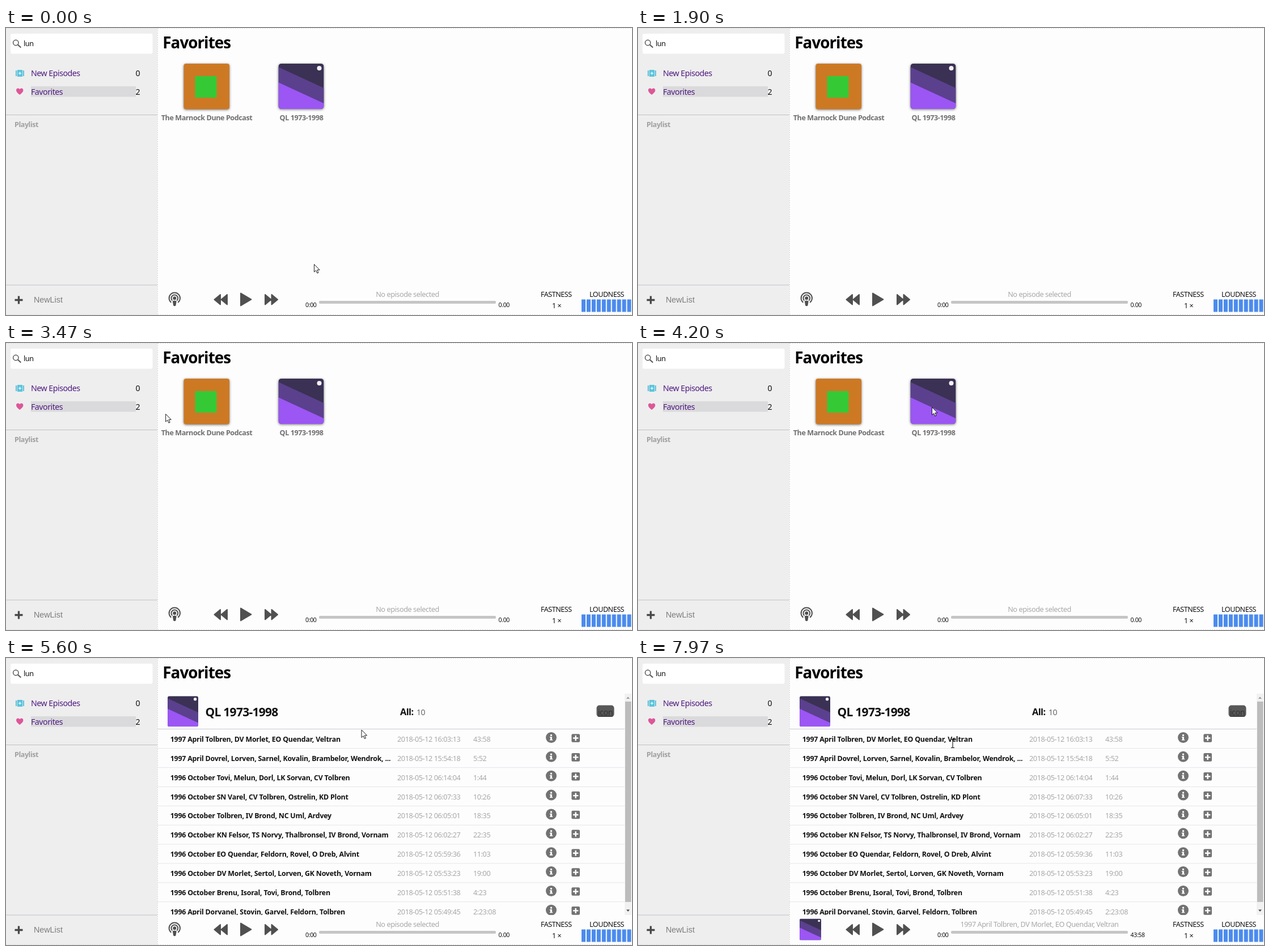
These frames come from a looping animation (1104 by 507 pixels, 8000 ms). An HTML page:

```html
<!DOCTYPE html>
<html lang="en">
<head>
<meta charset="utf-8">
<title>Podcast player</title>
<style>
html, body { margin: 0; width: 100%; height: 100%; overflow: hidden; background: #fdfdfd; }
svg { display: block; width: 1104px; height: 507px; }
text { font: 12.7px "Noto Sans", "Open Sans", sans-serif; letter-spacing: -.035em; fill: #111; }
.bold { font-weight: 700; }
.nav { font-size: 14.2px; }
.link { fill: #4f1a80; }
.muted { fill: #a8a8a8; }
.mid { text-anchor: middle; }
.time { font-size: 10.6px; }
.caps { font-size: 12.5px; }
.ink { fill: #505050; }
.row-title { font-size: 12.4px; font-weight: 700; letter-spacing: -.018em; }
.caption { font-size: 12.6px; fill: #707070; }
.card { filter: drop-shadow(0 1px 2px rgba(0, 0, 0, .55)); }
</style>
</head>
<body>
<svg viewBox="0 0 1104 507">
  <defs>
    <clipPath id="tile"><rect width="80" height="80" rx="5"/></clipPath>
    <clipPath id="listArea"><rect x="267" y="60" width="837" height="394"/></clipPath>
    <g id="stripes" clip-path="url(#tile)">
      <rect width="80" height="80" fill="#3a3154"/>
      <path d="M0 6L80 43V70L0 33Z" fill="#5b408e"/>
      <path d="M0 33L80 70V80H0Z" fill="#9b56f4"/>
      <circle cx="72" cy="8" r="4" fill="#f2f2f5"/>
    </g>
    <g id="info">
      <circle r="9.5" fill="#727272"/>
      <path d="M-1.5-5.5h3v3h-3ZM-2.6-1.3H1.5V3.4H2.6V5H-2.6V3.4H-1.5V.3H-2.6Z" fill="#fff"/>
    </g>
    <g id="add">
      <rect x="-7.3" y="-7.3" width="14.6" height="14.6" rx="2" fill="#727272"/>
      <path d="M-4.7 0H4.7M0-4.7V4.7" stroke="#fff" stroke-width="2.4"/>
    </g>
  </defs>

  <rect width="1104" height="507" fill="#fdfdfd"/>
  <rect width="267" height="507" fill="#eee"/>
  <path d="M0 .5H1104M267.5 0V507M0 506.5H1104" stroke="#dcdcd8" stroke-dasharray="2 2"/>

  <!-- sidebar -->
  <rect x="8" y="10" width="250.5" height="35.5" rx="3" fill="#fff"/>
  <g fill="none" stroke="#555" stroke-width="1.5">
    <circle cx="17.3" cy="26" r="4.7"/><path d="M20.8 29.5L26.3 34.5" stroke-width="2"/>
  </g>
  <text x="31" y="32">lun</text>
  <g fill="#5cc3dc">
    <path d="M17 75h2.2v10H17ZM29.8 75H32v10h-2.2ZM20 74h9v12h-9Z"/>
    <path d="M22 80h5M24.5 77.5v5" stroke="#e8f6fa" stroke-width="1.4"/>
  </g>
  <text class="nav link" x="44" y="85">New Episodes</text>
  <text class="nav" x="228.5" y="85">0</text>
  <rect x="44" y="103" width="185" height="18.5" fill="#dadadc"/>
  <path d="M24.2 118C20 114.5 18 112.5 18 109.7C18 106 22.5 105.2 24.2 108.3C26 105.2 30.4 106 30.4 109.7C30.4 112.5 28.5 114.5 24.2 118Z" fill="#dd5798"/>
  <text class="nav link" x="44" y="118">Favorites</text>
  <text class="nav" x="228.5" y="118">2</text>
  <path d="M0 153.5H267M0 454H267" stroke="#c2c2c8"/>
  <text class="bold" x="15" y="174.5" style="font-size:12.5px;fill:#a0a0a0">Playlist</text>
  <path d="M15.5 480.5h14M22.5 473.5v14" stroke="#484848" stroke-width="3.3"/>
  <text x="49" y="485" style="font:14.3px 'Liberation Sans',Arial,sans-serif;letter-spacing:0;fill:#7c7c7c">NewList</text>

  <text class="bold" x="276.3" y="35.5" style="font-size:27.8px;fill:#000">Favorites</text>

  <g id="grid">
    <g class="card" transform="translate(313.5 63)">
      <rect width="80.5" height="80.5" rx="4" fill="#cd7924"/>
      <rect x="20" y="22" width="38" height="38" fill="#35c936"/>
    </g>
    <g class="card"><use href="#stripes" transform="translate(480.5 63)"/></g>
    <text class="bold mid caption" x="354" y="163">The Marnock Dune Podcast</text>
    <text class="bold mid caption" x="521" y="163">QL 1973-1998</text>
  </g>

  <g id="list">
    <use href="#stripes" transform="translate(285 67.3) scale(.675)"/>
    <text class="bold" x="351.5" y="102.5" style="font-size:21px">QL 1973-1998</text>
    <text class="bold" x="695" y="101" style="font-size:16.3px">All:</text>
    <text x="724" y="101" style="font-size:14px;fill:#666">10</text>
    <rect x="1041.5" y="83.5" width="31" height="20.5" rx="5" fill="#585858"/>
    <text class="mid" x="1057" y="101" style="font-size:14.5px;fill:#333;text-decoration:underline">icon</text>
    <path d="M267 125.5H1091" stroke="#cacad4"/>
    <g id="rows" clip-path="url(#listArea)"></g>
    <rect x="1091" y="63" width="12" height="391" fill="#f1f1f1"/>
    <rect x="1092" y="77" width="10.5" height="354" fill="#bcbcbc"/>
    <path d="M1094 72l3-3.5 3 3.5Z" fill="#9a9a9a"/>
    <path d="M1094 444.5l3 3.5 3-3.5Z" fill="#484848"/>
  </g>

  <!-- player -->
  <g id="castIcon" transform="translate(297.3 477.3)">
    <path d="M-6 7.6A9.7 9.7 0 1 1 6 7.6M-4 4.2A5.8 5.8 0 1 1 4 4.2" fill="none" stroke="#505050" stroke-width="2"/>
    <circle r="3" class="ink"/>
    <path d="M-3.3 6Q-3.3 4.3 0 4.3T3.3 6L2.2 12.8Q1.8 14 0 14T-2.2 12.8Z" class="ink"/>
  </g>
  <use id="thumb" href="#stripes" transform="translate(285 460.5) scale(.475)"/>
  <g class="ink" stroke="#505050" stroke-width="2" stroke-linejoin="round">
    <path d="M378 471V488.5L367.5 479.7ZM390 471V488.5L379.5 479.7Z"/>
    <path d="M414 468.5V490.5L432.5 479.5Z"/>
    <path d="M457 471V488.5L467.5 479.7ZM468.5 471V488.5L479 479.7Z"/>
  </g>
  <text id="nowPlaying" class="muted mid" x="708" y="474.5"></text>
  <text class="time" x="528" y="493">0:00</text>
  <rect x="552" y="482" width="312" height="5" rx="2" fill="#c5c5c5"/>
  <text id="length" class="time" x="868.5" y="493"></text>
  <text class="caps" x="943" y="474.5">FASTNESS</text>
  <text class="caps" x="963" y="494.5">1 ×</text>
  <text class="caps" x="1029" y="474.5">LOUDNESS</text>
  <g id="bars" fill="#4b8bee"></g>

  <path id="arrow" d="M0 0V13.5L3.2 10.7 5.3 15.6 7.5 14.7 5.4 9.8H9.6Z" fill="#fff" stroke="#111" stroke-width=".95"/>
  <path id="beam" d="M-3-7.5H-.8L0-6.7 .8-7.5H3M0-6.7V6.7M-3 7.5H-.8L0 6.7 .8 7.5H3" fill="none" stroke="#111" stroke-width="1.1"/>
</svg>
<script>
const LOOP = 8000, OPEN_LIST = 4870, LOAD_EPISODE = 7670;
const $ = id => document.getElementById(id);

// title, time of day, length
const episodes = [
  ["1997 April Tolbren, DV Morlet, EO Quendar, Veltran", "16:03:13", "43:58"],
  ["1997 April Dovrel, Lorven, Sarnel, Kovalin, Brambelor, Wendrok, ...", "15:54:18", "5:52"],
  ["1996 October Tovi, Melun, Dorl, LK Sorvan, CV Tolbren", "06:14:04", "1:44"],
  ["1996 October SN Varel, CV Tolbren, Ostrelin, KD Plont", "06:07:33", "10:26"],
  ["1996 October Tolbren, IV Brond, NC Uml, Ardvey", "06:05:01", "18:35"],
  ["1996 October KN Felsor, TS Norvy, Thalbronsel, IV Brond, Vornam", "06:02:27", "22:35"],
  ["1996 October EO Quendar, Feldorn, Rovel, O Dreb, Alvint", "05:59:36", "11:03"],
  ["1996 October DV Morlet, Sertol, Lorven, GK Noveth, Vornam", "05:53:23", "19:00"],
  ["1996 October Brenu, Isoral, Tovi, Brond, Tolbren", "05:51:38", "4:23"],
  ["1996 April Dorvanel, Stovin, Garvel, Feldorn, Tolbren", "05:49:45", "2:23:08"]
];

$("rows").innerHTML = episodes.map(([title, clock, length], i) => `
  <g transform="translate(0 ${(i * 33.87).toFixed(2)})">
    <text class="row-title" x="289.7" y="148">${title}</text>
    <text class="muted" x="690" y="148">2018-05-12 ${clock}</text>
    <text class="muted" x="824" y="148">${length}</text>
    <use href="#info" x="961.5" y="140.5"/>
    <use href="#add" x="1004.7" y="141.5"/>
    <path d="M267 159.7H1091" stroke="#e6e6ec"/>
  </g>`).join("");

$("bars").innerHTML = Array.from({ length: 10 }, (_, i) =>
  `<rect x="${1015 + i * 8.95}" y="479.5" width="7" height="22"/>`).join("");

// pointer stops: time, x, y
const stops = [
  [30, 543.5, 417.5], [1130, -20, 300], [1950, -20, 190], [2830, 145, 132.5],
  [3000, 145, 132.5], [4150, 518.5, 113.5], [4900, 518.5, 113.5],
  [5560, 627, 127], [5700, 627, 127], [6650, 555, 151]
];

function pointerAt(t) {
  const i = stops.findIndex(s => s[0] > t);
  if (i < 0) return stops[stops.length - 1].slice(1);
  if (i === 0) return stops[0].slice(1);
  const [t0, x0, y0] = stops[i - 1], [t1, x1, y1] = stops[i];
  const u = (t - t0) / (t1 - t0), k = u * u * (3 - 2 * u);
  return [x0 + (x1 - x0) * k, y0 + (y1 - y0) * k];
}

const show = (id, on) => $(id).style.display = on ? "" : "none";

function setText(id, value) {
  if ($(id).textContent !== value) $(id).textContent = value;
}

function draw(t) {
  const listed = t >= OPEN_LIST, loaded = t >= LOAD_EPISODE;
  show("grid", !listed);
  show("list", listed);
  show("castIcon", !loaded);
  show("thumb", loaded);
  setText("nowPlaying", loaded ? episodes[0][0] : "No episode selected");
  setText("length", loaded ? episodes[0][2] : "0.00");

  const [x, y] = pointerAt(t);
  const overTitle = listed && x < 592 && y > 135;
  show("arrow", !overTitle);
  show("beam", overTitle);
  $(overTitle ? "beam" : "arrow").setAttribute("transform", `translate(${x} ${y})`);
}

const start = performance.now();
function tick() {
  draw((performance.now() - start) % LOOP);
  requestAnimationFrame(tick);
}
tick();
</script>
</body>
</html>
```
